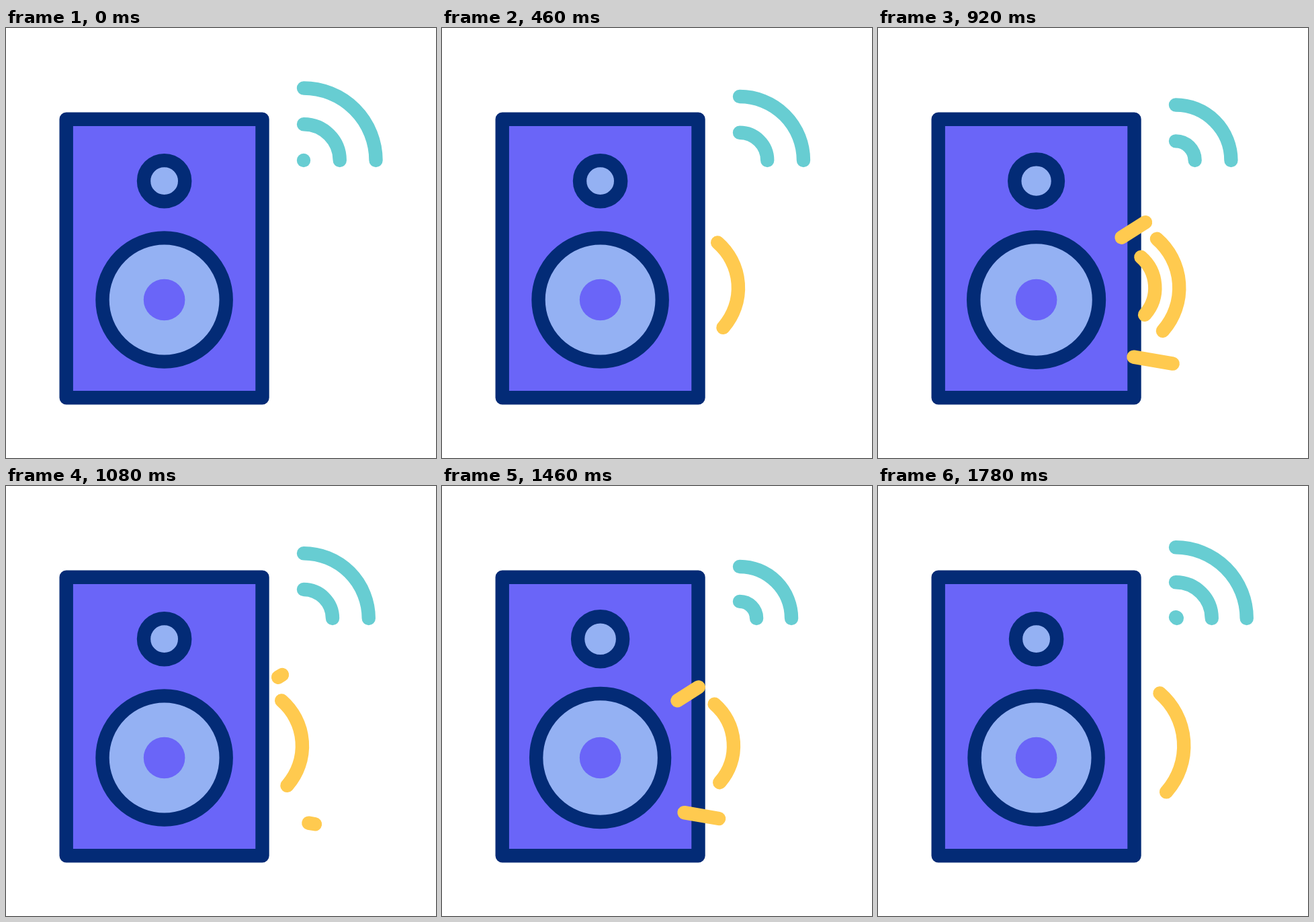
Animation, 640 px wide and 640 px high, one loop 1.8 s. Source, as an HTML page with a canvas:

```html
<!DOCTYPE html>
<html lang="en">
<head>
<meta charset="utf-8">
<title>Speaker</title>
<style>
  html, body { margin: 0; width: 100%; height: 100%; overflow: hidden; background: #fff; }
  canvas { display: block; width: 640px; height: 640px; }
</style>
</head>
<body>
<canvas id="stage" width="640" height="640"></canvas>
<script>
const LOOP = 1800, STEP = 20, LINE = 20.4;
const NAVY = '#032b76', VIOLET = '#6a65f8', SKY = '#94b1f3', TEAL = '#67cdd2', YELLOW = '#ffca4f';

// start times in ms
const SIGNALS = [-1200, -600, 0, 600, 1180, 1760];
const PULSES = [0, 600, 1180];
const SPARKS = [7, 689, 1288];
const RIPPLES = [0, 620, 1240];

const ctx = document.getElementById('stage').getContext('2d');
const rad = deg => deg * Math.PI / 180;
const clamp = v => Math.min(1, Math.max(0, v));
const ease = v => { v = clamp(v); return v * v * (3 - 2 * v); };

function stroke(color) {
  ctx.strokeStyle = color;
  ctx.stroke();
}

function disc(x, y, r, fill, line) {
  ctx.beginPath();
  ctx.arc(x, y, r, 0, 2 * Math.PI);
  ctx.fillStyle = fill;
  ctx.fill();
  if (line) stroke(line);
}

function arc(x, y, r, from, to, color) {
  ctx.beginPath();
  ctx.arc(x, y, r, rad(from), rad(to));
  stroke(color);
}

// rises from begin to top, falls back to zero at end
function bump(t, begin, top, end, height) {
  return height * clamp(Math.min((t - begin) / (top - begin), (end - t) / (end - top)));
}

function pulse(t, begin, top, end, height) {
  return Math.max(...PULSES.map(s => bump(t - s, begin, top, end, height)));
}

function drawSpeaker(t) {
  ctx.beginPath();
  ctx.rect(89.7, 135.7, 291.8, 414.6);
  ctx.fillStyle = VIOLET;
  ctx.fill();
  stroke(NAVY);
  disc(235.6, 227.7, 30.6 + pulse(t, 30, 205, 380, 5.1), SKY, NAVY);
  disc(235.6, 404.5, 92.1 + pulse(t, 0, 157, 345, 9.75), SKY, NAVY);
  disc(235.6, 404.5, 30.8, VIOLET);
}

function drawSignals(t) {
  for (const s of SIGNALS) {
    const age = t - s;
    if (age < 0 || age > 1345) continue;
    const r = age * 0.0896;
    if (r < 0.3) disc(443, 197, LINE / 2, TEAL);
    else arc(443, 197, r, -90, 0, TEAL);
  }
}

function drawRipples(t) {
  for (const s of RIPPLES) {
    for (const delay of [0, 201]) {
      const r = 42.6 + 0.179 * (t - s - delay);
      if (r > 50 && r < 108) arc(352, 386.7, r, -49.2, 41.7, YELLOW);
    }
  }
}

function segment(x0, y0, x1, y1, from, to) {
  const at = k => [x0 + (x1 - x0) * k, y0 + (y1 - y0) * k];
  ctx.beginPath();
  ctx.moveTo(...at(from));
  ctx.lineTo(...at(to));
  stroke(YELLOW);
}

function drawSparks(t) {
  const span = 325;
  for (const s of SPARKS) {
    const age = (t - s) / span;
    if (age <= 0 || age >= 1.39) continue;
    const tail = ease(age - 0.39), head = ease(age);
    segment(347, 321.5, 411, 281, tail, head);
    segment(355, 485.2, 460, 503.3, tail, head);
  }
}

function draw(t) {
  ctx.fillStyle = '#fff';
  ctx.fillRect(0, 0, 640, 640);
  ctx.lineWidth = LINE;
  ctx.lineCap = ctx.lineJoin = 'round';
  drawSpeaker(t);
  drawSignals(t);
  drawRipples(t);
  drawSparks(t);
}

const begin = performance.now();
function tick() {
  const now = performance.now() - begin;
  draw(Math.floor((now + 2) / STEP) * STEP % LOOP);
  requestAnimationFrame(tick);
}
tick();
</script>
</body>
</html>
```
